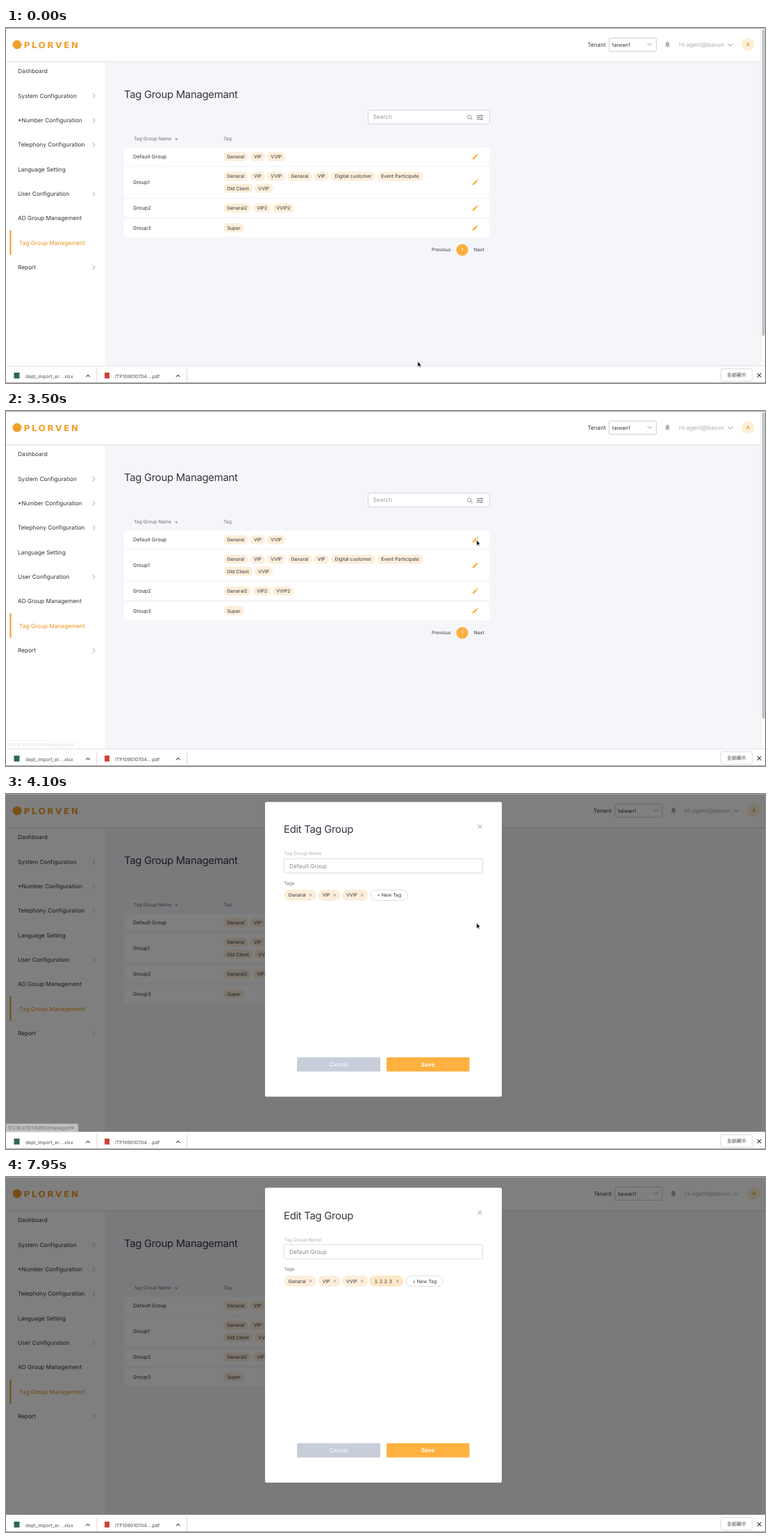
An HTML page that plays this animation: 1093 by 512 pixels, repeating every 8 s.

```html
<!DOCTYPE html>
<html lang="en">
<head>
<meta charset="utf-8">
<title>Tag Group Management</title>
<style>
  html, body { margin: 0; width: 100%; height: 100%; overflow: hidden; background: #fff; }
  svg { display: block; width: 100vw; height: 100vh; }
  text { font-family: Inter, "Noto Sans CJK TC", "Noto Sans CJK", sans-serif; text-rendering: geometricPrecision; white-space: pre; }
  .title { letter-spacing: -.3px; }
  .brand { font-family: "DejaVu Sans", sans-serif; font-weight: 700; letter-spacing: 2.4px; }
  .cjk { font-family: "Noto Sans CJK TC", "Noto Sans CJK", sans-serif; }
  .mid { text-anchor: middle; }
  .semi { font-weight: 600; }
  .line { fill: none; stroke-linecap: round; stroke-linejoin: round; }
</style>
</head>
<body>
<svg id="stage" viewBox="0 0 1093 512" preserveAspectRatio="none"></svg>
<script>
const LOOP = 8000;
const INK = '#33343f', GREY = '#9b9ea9', ORANGE = '#fbb040', DEEP = '#e9931c', CREAM = '#fdeeda';

// ---- drawing helpers (y of text is its optical centre) ----
const text = (x, y, s, size, fill = INK, cls = '') =>
  `<text x="${x}" y="${y + size * .36}" font-size="${size}" fill="${fill}" class="${cls}">${s}</text>`;
const rect = (x, y, w, h, fill, r = 0, stroke = 'none') =>
  `<rect x="${x}" y="${y}" width="${w}" height="${h}" rx="${r}" fill="${fill}" stroke="${stroke}"/>`;
const line = (d, stroke, w = 1) => `<path class="line" d="${d}" stroke="${stroke}" stroke-width="${w}"/>`;
const circle = (x, y, r, fill) => `<circle cx="${x}" cy="${y}" r="${r}" fill="${fill}"/>`;
const group = (id, s, attr = '') => `<g id="${id}" ${attr}>${s}</g>`;
const cross = (x, y, r, stroke, w) => line(`M${x - r} ${y - r}l${2 * r} ${2 * r}m0 ${-2 * r}l${-2 * r} ${2 * r}`, stroke, w);
const chevron = (x, y, w, h, stroke) => line(`M${x - w} ${y - h / 2}l${w} ${h}l${w} ${-h}`, stroke, .9);

const pencil = y => `<path transform="translate(671.8 ${y - 4})" fill="${ORANGE}"
  d="M0 8V6.2L4.9 1.3 6.7 3.1 1.8 8ZM5.5 .7L6.2 0Q6.5-.2 6.8 0L8 1.2Q8.2 1.5 8 1.8L7.3 2.5Z"/>`;
const chip = (x, end, y, s) =>
  rect(x, y - 6.5, end - x, 13, CREAM, 6.5) + text((x + end) / 2, y, s, 6.85, INK, 'mid');

function sidebar() {
  const items = [['Dashboard'], ['System Configuration', 1], ['*Number Configuration', 1],
    ['Telephony Configuration', 1], ['Language Setting'], ['User Configuration', 1],
    ['AD Group Management'], ['Tag Group Management'], ['Report', 1]];
  return rect(0, 48, 142.5, 440, '#fff') + rect(5.5, 292, 2, 35, '#ee9a1f') +
    items.map(([name, more], i) => {
      const y = 62.3 + i * 35.35, on = i === 7;
      return text(on ? 19 : 17, y, name, 8.3, on ? DEEP : INK) +
        (more ? line(`M125 ${y - 2.8}l3.2 3l-3.2 3`, '#8b8e99', .8) : '');
    }).join('');
}

function header() {
  const bell = `<path fill="#aeb1bc" d="M949 26.8L950 25.4V22.8Q950.2 20.2 952.6 19.6Q955 20.2 955.2 22.8V25.4L956.3 26.8ZM951.4 27.5H953.8Q953.4 28.7 952.6 28.7Q951.8 28.7 951.4 27.5Z"/>`;
  return rect(0, 48, 1093, 1, '#e4e5e9') + rect(0, 49, 1093, 1, '#eff0f4') + rect(0, 0, 1093, 48, '#fff') +
    circle(16, 24, 6.5, '#f0a02c') + text(25.5, 24.2, 'PLORVEN', 12.2, '#f0a02c', 'brand') +
    group('account',
      text(837.5, 24, 'Tenant', 8.1) +
      rect(868.5, 14.5, 68, 19, '#fff', 1.5, '#cfd1d6') + text(873, 24, 'taiwan1', 7.4) +
      chevron(927, 23.8, 3, 3, '#8b8e99') + bell +
      text(969, 24, 'Hi agent@bavun', 8.3, '#a9acb7') + chevron(1043, 24.4, 3.2, 3.4, '#8b8e99') +
      circle(1068.5, 23.7, 9.2, CREAM) + text(1068.5, 23.8, 'A', 7, DEEP, 'mid semi'));
}

function table() {
  const rows = [
    ['Default Group', 172.6, 26, [[313, 348.5, 0, 'Genaral'], [352, 373, 0, 'VIP'], [376, 402.5, 0, 'VVIP']]],
    ['Group1', 200.3, 44.3, [[313, 348.5, -8.6, 'Genaral'], [352, 373, -8.6, 'VIP'], [376, 402.5, -8.6, 'VVIP'],
      [405.5, 440.5, -8.6, 'Genaral'], [443.5, 465, -8.6, 'VIP'], [468, 531.5, -8.6, 'Digital customer'],
      [534.5, 600.5, -8.6, 'Event Participate'], [313, 355, 8.6, 'Old Client'], [358, 384.5, 8.6, 'VVIP']]],
    ['Group2', 246.6, 26, [[313, 352.5, 0, 'Genaral2'], [356, 381.5, 0, 'VIP2'], [384.5, 414.5, 0, 'VVIP2']]],
    ['Group3', 275.1, 26, [[313, 343, 0, 'Super']]]
  ];
  return text(170, 95.3, 'Tag Group Managemant', 14.9, INK, 'title') +
    rect(521.5, 118.5, 175, 20, '#fff', 2, '#d0d3da') + text(528.5, 128.5, 'Search', 8.3, '#9b9da5') +
    `<circle cx="667.2" cy="128.3" r="2.7" fill="none" stroke="#8b8e99" stroke-width=".9"/>` +
    line('M669.3 130.4l2.1 2.1', '#8b8e99') +
    line('M678 126.3h9M678 129h9M678 131.7h9', '#777a85', .9) +
    line('M684.5 125.5v1.6M680.5 128.2v1.6M684.5 130.9v1.6', '#777a85') +
    text(184, 160, 'Tag Group Name', 6.75, '#6b6e79') + '<path d="M243 159.5h4.6l-2.3 2.4z" fill="#8b8e99"/>' +
    text(313, 160, 'Tag', 6.75, '#6b6e79') +
    rows.map(([name, y, h, tags]) => {
      const c = y + h / 2;
      return rect(170, y, 526.5, h, '#fff') + text(183, c, name, 7.3) +
        tags.map(([a, b, dy, s]) => chip(a, b, c + dy, s)).join('') + pencil(c);
    }).join('') +
    text(626.8, 320, 'Previous', 6.75, INK, 'mid') + circle(657, 320, 8.6, ORANGE) +
    text(657, 320, '1', 6.8, '#fff', 'mid') + text(681.3, 320, 'Next', 6.75, INK, 'mid');
}

function downloads() {
  const up = x => line(`M${x - 2.6} 503l2.6-2.6l2.6 2.6`, '#5f6368', 1.1);
  return rect(0, 487, 1093, 25, '#fff') + rect(0, 487, 1093, .8, '#d9dade') +
    rect(11.5, 497, 8, 8.5, '#2d6a4c') + text(28, 502.2, 'dept_import_er....xlsx', 6.85, '#4c4e53') + up(118) +
    rect(130.5, 491, 1, 20, '#d5d6da') +
    rect(142, 497, 7, 8.5, '#d0413a') + text(157, 502.2, 'ITP109010704....pdf', 6.85, '#4c4e53') + up(247.7) +
    rect(260, 491, 1, 20, '#d5d6da') +
    rect(1029.5, 491.5, 45, 18, '#fff', 2, '#d9dbe0') + text(1052, 500.6, '全部顯示', 6.9, '#3c4043', 'cjk mid') +
    cross(1084.7, 500.8, 2.5, '#45484d', 1.2) + rect(0, 511, 1093, 1, '#a9a9a9');
}

const newTag = (id, x) => group(id,
  rect(x + .3, 142.6, 52.8, 15.2, '#fff', 7.6, '#dcdde1') + text(x + 26.7, 150.2, '+ New Tag', 6.85, INK, 'mid'));

function modal() {
  const tag = (x, end, tx, s, fill = CREAM, cls = '') =>
    rect(x, 142.2, end - x, 15.8, fill, 7.9) + text(tx, 150.1, s, 6.9, INK, cls) +
    cross(end - 8.4, 150.1, 1.5, '#96836a', .8);
  return rect(373, 15.6, 341, 425.2, '#fff', 2) + text(400, 55.3, 'Edit Tag Group', 14.9, INK, 'title') +
    cross(682.3, 51.2, 2.6, '#8d8f96', .9) +
    text(400.3, 90.2, 'Tag Group Name', 6.75, '#b0b2b9') +
    rect(400.5, 97.5, 286, 20.5, '#fff', 1.5, '#dcdde1') + text(408, 107.9, 'Default Group', 8.2, '#85878e') +
    text(400.3, 132.3, 'Tags', 6.7, '#6b6e79') +
    tag(400.5, 447, 406.5, 'Genaral') + tag(449.5, 481.7, 455.5, 'VIP') + tag(484, 521.2, 490, 'VVIP') +
    newTag('add', 525) +
    group('field', rect(525, 143.7, 70.3, 13.6, '#fff', 6.8, '#f3c878') +
      text(533.5, 150.3, '', 6.9, INK, 'cjk') + rect(0, 146, .8, 9, '#222')) +
    group('fresh', tag(523.2, 572.4, 529.6, '１２２３', '#fde6c6', 'cjk') + newTag('again', 576)) +
    rect(419, 384, 120, 20.5, '#c7ceda', 1.5) + text(479, 394.4, 'Cancel', 8.3, '#fff', 'mid') +
    rect(548, 384, 119.5, 20.5, '#ffb140', 1.5) + text(607.5, 394.4, 'Save', 8.3, '#fff', 'mid semi');
}

document.getElementById('stage').innerHTML =
  rect(0, 0, 1093, 512, '#f5f6fa') + sidebar() + table() + header() +
  group('scroll', rect(1086.5, 0, 6.5, 488, '#fafafa') + rect(1086.2, 0, .6, 488, '#e6e6e6') + rect(1088.7, 2, 4, 442, '#c1c1c1', 2)) +
  group('gutter', rect(1086.8, 50, 6.2, 438, '#fff')) +
  group('shade', rect(0, 0, 1093, 488, '#000')) + group('dialog', modal()) +
  group('status', rect(-2, 475.5, 139, 12.5, '#fff', 2, '#c3c5ca') + text(2.5, 481.6, '', 6.9, '#54575c')) +
  downloads() + rect(0, 0, 1093, 1, '#a3a3a3') +
  group('arrow', '<path d="M0 0V8L1.9 6.4 3 9 4.5 8.4 3.4 5.8H5.8Z" fill="#111" stroke="#fff" stroke-width=".7"/>') +
  group('beam', line('M-1.6-4.4Q0-4.4 0-3.2V3.2Q0 4.4-1.6 4.4M1.6-4.4Q0-4.4 0-3.2M0 3.2Q0 4.4 1.6 4.4M-1 .9H1', '#222', .9));

// ---- motion ----
const $ = id => document.getElementById(id);
const part = Object.fromEntries(['account', 'scroll', 'gutter', 'shade', 'dialog', 'status', 'arrow', 'beam', 'add', 'field', 'fresh']
  .map(id => [id, $(id)]));
const [statusBox, statusText] = part.status.children;
const [, typed, caret] = part.field.children;

const path = [ // time, x, y of the pointer
  [0, 593, 481], [400, 470, 370], [850, 330, 262], [1300, 225, 250], [1700, 130, 268], [1800, 104, 274],
  [1950, 270, 250], [2150, 568, 215.5], [2550, 664, 190], [3200, 677.5, 186], [4400, 677.5, 186],
  [4600, 625, 168], [4850, 558, 153.5], [8000, 558, 153.5]];
const keys = [[6400, 1], [6600, 2], [6800, 3], [7450, 4]];

const ramp = (t, a, b) => Math.min(1, Math.max(0, (t - a) / (b - a)));
const within = (t, a, b) => t >= a && t < b;
const show = (el, on) => el.setAttribute('visibility', on ? 'inherit' : 'hidden');
const easeOut = p => 1 - (1 - p) ** 2;

function pointer(t) {
  const i = Math.max(0, path.findIndex(p => p[0] > t) - 1);
  const [a, b] = [path[i], path[i + 1]];
  const p = ramp(t, a[0], b[0]);
  const k = p * p * (3 - 2 * p) * .4 + p * .6;
  return [a[1] + (b[1] - a[1]) * k, a[2] + (b[2] - a[2]) * k];
}

function render(t) {
  const [x, y] = pointer(t);
  const open = t >= 3720, input = within(t, 4950, 7900), done = t >= 7900;
  const ibeam = within(t, 2100, 2250) || t >= 4950;
  show(part.arrow, !ibeam);
  show(part.beam, ibeam && t < 6400);
  for (const c of [part.arrow, part.beam]) c.setAttribute('transform', `translate(${x} ${y})`);

  show(part.scroll, !open);
  show(part.gutter, open);
  part.account.setAttribute('transform', `translate(${open ? 8.5 : 0} 0)`);
  part.shade.setAttribute('opacity', .5 * ramp(t, 3725, 3875));

  show(part.dialog, t > 3900);
  part.dialog.setAttribute('opacity', ramp(t, 3900, 4050));
  part.dialog.setAttribute('transform', `translate(0 ${-36 * (1 - easeOut(ramp(t, 3900, 4205)))})`);

  const late = t > 3000;
  statusText.textContent = '172.16.0.101:8080/imanager/#' + (late ? '' : '/ad_group');
  statusBox.setAttribute('width', late ? 106 : 139);
  part.status.setAttribute('opacity', late
    ? ramp(t, 3480, 3600) * (1 - ramp(t, 4000, 4200) * 1)
    : ramp(t, 1770, 1850) * (1 - ramp(t, 2620, 2820)));

  const count = keys.filter(k => t >= k[0]).length;
  typed.textContent = '１２２３'.slice(0, count);
  caret.setAttribute('x', 533.9 + count * 6.9);
  show(part.add, t < 4950);
  show(part.field, input);
  show(caret, input && (within(t, 5620, 6050) || within(t, 6400, 7250) || t >= 7450));
  show(part.fresh, done);
}

const start = performance.now();
(function tick() {
  render((performance.now() - start) % LOOP);
  requestAnimationFrame(tick);
})();
</script>
</body>
</html>
```
